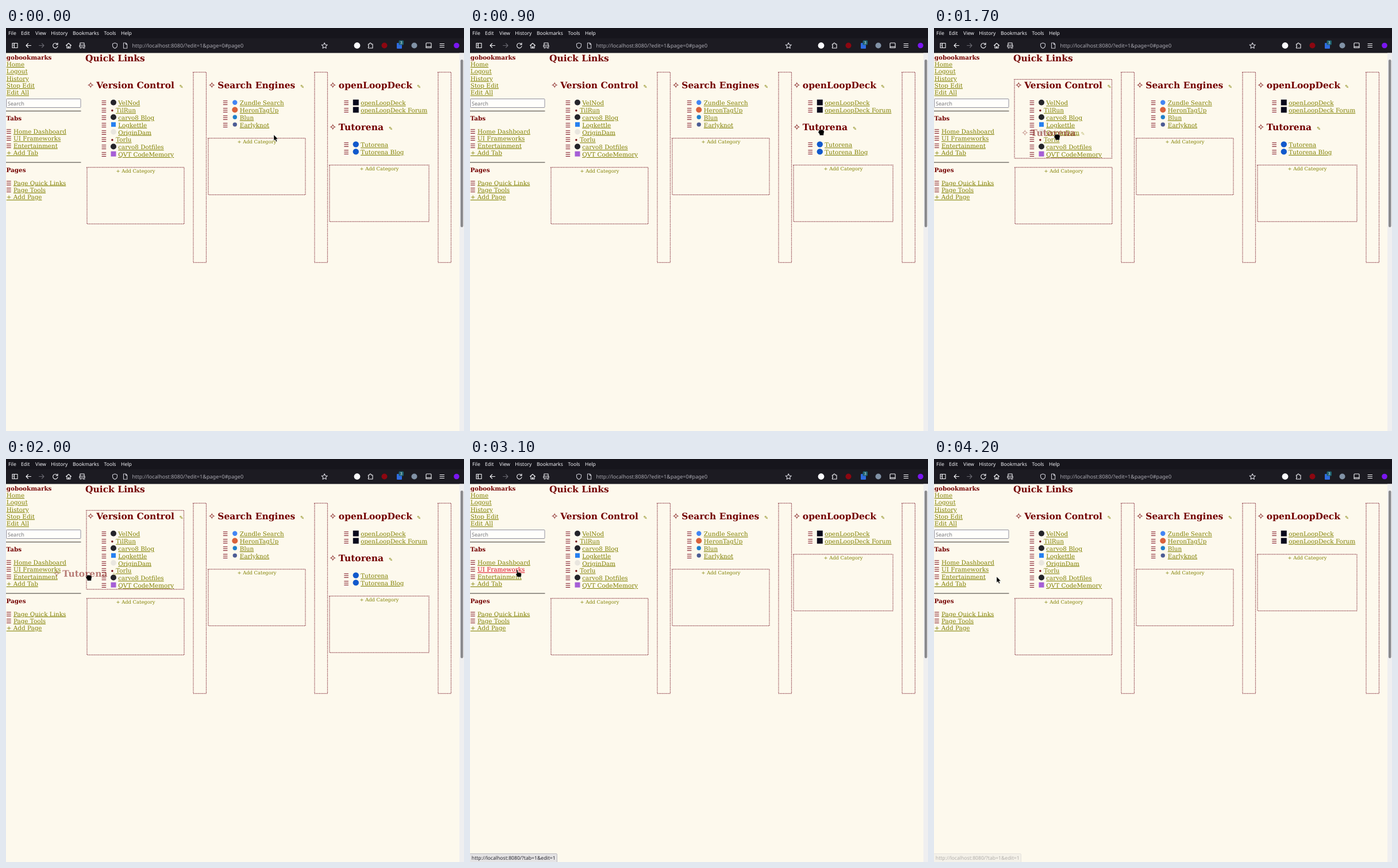
An HTML page for the animation above (4.3 s loop, 797x702 px).

```html
<!DOCTYPE html>
<html lang="en">
<head>
<meta charset="utf-8">
<title>Quick Links</title>
<style>
html, body { margin: 0; width: 797px; height: 702px; overflow: hidden; background: #fdf9ed; }
svg { display: block; }
text { font: 10.4px "DejaVu Serif", serif; white-space: pre; text-rendering: geometricPrecision; }
.b { font-weight: bold; fill: #730000; }
.h { font-size: 15.5px; font-weight: bold; fill: #730000; }
.a { fill: #808000; text-decoration: underline; text-decoration-thickness: 0.8px; }
.hot { fill: #dc0a1e; }
.small { font-size: 8.4px; fill: #808000; text-anchor: middle; }
.sym { font-family: "DejaVu Sans", sans-serif; fill: #7a0a1c; }
.star { font: bold 15.5px "DejaVu Sans", sans-serif; fill: #730000; }
.pen { font: 8.4px "DejaVu Sans", sans-serif; fill: #808000; }
.ui { font: 8.65px "Noto Sans", sans-serif; }
.url { font: 9.1px "Noto Sans", sans-serif; }
.dots { fill: none; stroke: #700c1c; stroke-width: 1.45; stroke-linecap: round; stroke-dasharray: 0 2.667; }
.ico { fill: none; stroke: #f4f4f8; stroke-width: 1.1; stroke-linecap: round; stroke-linejoin: round; }
</style>
</head>
<body>
<svg id="stage" width="797" height="702" viewBox="0 0 797 702"></svg>
<script>
const stage = document.getElementById('stage');
const LOOP = 4300, STEP = 100;

function add(parent, tag, attrs, str) {
  const el = document.createElementNS('http://www.w3.org/2000/svg', tag);
  for (const k in attrs) el.setAttribute(k, attrs[k]);
  if (str !== undefined) el.textContent = str;
  parent.appendChild(el);
  return el;
}
const group = (p = stage) => add(p, 'g', {});
const text = (p, x, y, cls, str, fill) =>
  add(p, 'text', fill ? { x, y, class: cls, fill } : { x, y, class: cls }, str);
const rect = (p, x, y, width, height, fill, rx = 0) =>
  add(p, 'rect', { x, y, width, height, fill, rx });
const disc = (p, cx, cy, r, fill) => add(p, 'circle', { cx, cy, r, fill });
const dots = (p, x, y, width, height) => add(p, 'rect', { x, y, width, height, class: 'dots' });
const icon = (d, stroke) => add(stage, 'path', stroke ? { d, class: 'ico', style: 'stroke:' + stroke } : { d, class: 'ico' });
const show = (el, on) => el.setAttribute('visibility', on ? 'visible' : 'hidden');

function heading(p, x, y, str, penX) {
  text(p, x, y, 'star', '✧');
  text(p, x + 16.5, y, 'h', str);
  text(p, penX, y - 0.3, 'pen', '✎');
}

// Each item: [label, colour, shape, size]; no colour means a bullet.
function list(p, x, y, items, gap) {
  items.forEach(([label, color, shape, size], i) => {
    const by = y + i * 12.8, cx = x + 20.8, cy = by - 4.7;
    text(p, x - 0.4, by, 'sym', '☰');
    if (!color) {
      disc(p, x + 18.7, by - 3.4, 1.7, '#700008');
      text(p, x + 25, by, 'a', label);
      return;
    }
    if (shape === 'sq') rect(p, cx - size, cy - size, size * 2, size * 2, color);
    else disc(p, cx, cy, size, color);
    text(p, x + gap, by, 'a', label);
  });
}

function addBox(p, x, y, w) {
  dots(p, x, y, w, 98.5);
  text(p, x + w / 2, y + 9, 'small', '+ Add Category');
}

function browser() {
  rect(stage, 0, 0, 797, 43.5, '#1c1b22');
  rect(stage, 0, 0, 797, 18, '#16151c');
  [['File', 4], ['Edit', 26], ['View', 51], ['History', 78.3], ['Bookmarks', 116], ['Tools', 170.5], ['Help', 200]]
    .forEach(([s, x]) => text(stage, x, 11.8, 'ui', s, '#f6f6fa'));
  icon('M11 26.5h9v8h-9zM14.5 26.5v8M12.5 29h.5M12.5 31h.5');
  icon('M43.5 30.5h-8.5M38.5 27l-3.5 3.5l3.5 3.5');
  icon('M57.5 30.5h8.5M62.5 27l3.5 3.5l-3.5 3.5', '#686770');
  icon('M89.3 28.2A4.2 4.2 0 1 0 90 31.5M90 26v3h-3');
  icon('M104.5 30.5l4.5-4l4.5 4M106 30v5h6v-5M108.3 35v-2.5h1.5v2.5');
  icon('M129 30v-4h7v4M128 30h9v3h-9zM129 35h2M134 35h3');
  icon('M189.5 26l4 1.4v3q0 3.2-4 5q-4-1.8-4-5v-3z', '#c8c8d0');
  icon('M204.5 26h4l2.2 2.2v7h-6.2zM208.5 26v2.5h2', '#c8c8d0');
  text(stage, 219.5, 34, 'url', 'http://localhost:8080/?edit=1&page=0#page0', '#a9a8b0');
  icon('M554.2 25.8l1.5 3.2l3.5.4l-2.6 2.4l.7 3.5l-3.1-1.8l-3.1 1.8l.7-3.5l-2.6-2.4l3.5-.4z', '#d8d8e0');
  disc(stage, 611, 30.5, 5.4, '#fbfbfe');
  icon('M630.5 28h2v-1q1.5-2 3 0v1h2.5v7h-7.5v-2q2-1.3 0-2.6z');
  disc(stage, 658.5, 30.5, 5, '#8c0711');
  rect(stage, 680, 26, 9, 10, '#2f6be0', 1);
  rect(stage, 683.5, 21.5, 8.5, 8, '#1d5f6c', 1.5);
  text(stage, 685.7, 28.2, 'ui', '3', '#e6f4f6').style.fontSize = '7px';
  disc(stage, 710.5, 30.5, 5, '#8192a6');
  icon('M731 27q0-1 1-1h7q1 0 1 1v7.5h-9zM731 32.5h9');
  icon('M755 27.5h7.5M755 30.5h7.5M755 33.5h7.5');
  disc(stage, 784, 30.5, 4.8, '#7a16f0');
  rect(stage, 789, 43.5, 8, 658.5, '#efeff0');
  rect(stage, 791, 55, 4.5, 292, '#8a8a8d', 2.2);
}

let hoverLink;
function sidebar() {
  text(stage, 0.7, 54.6, 'b', 'gobookmarks');
  ['Home', 'Logout', 'History', 'Stop Edit', 'Edit All']
    .forEach((s, i) => text(stage, 0.8, 67 + i * 12.35, 'a', s));
  add(stage, 'rect', { x: 0.5, y: 123.5, width: 129.5, height: 15, rx: 1, fill: '#fffefb', stroke: '#8f8f9d' });
  text(stage, 3, 134.5, 'url', 'Search', '#77777c');
  rect(stage, 0, 144, 130.5, 1.2, '#5a5752');
  rect(stage, 0, 233.5, 130.5, 1.2, '#5a5752');
  const menu = (title, y, names, last) => {
    text(stage, 0.5, y, 'b', title);
    names.forEach((s, i) => {
      text(stage, 0.3, y + 23 + i * 12.35, 'sym', '☰');
      const el = text(stage, 13, y + 23 + i * 12.35, 'a', s);
      if (s === 'UI Frameworks') hoverLink = el;
    });
    text(stage, 0.8, y + 23 + names.length * 12.35, 'a', last);
  };
  menu('Tabs', 161, ['Home Dashboard', 'UI Frameworks', 'Entertainment'], '+ Add Tab');
  menu('Pages', 250.5, ['Page Quick Links', 'Page Tools'], '+ Add Page');
}

browser();
sidebar();

text(stage, 138, 58.4, 'h', 'Quick Links');
[326, 537, 752].forEach(x => dots(stage, x, 77, 22.5, 331.5));

heading(stage, 140.7, 105.3, 'Version Control', 301.5);
list(stage, 166.2, 134.4, [
  ['VelNod', '#24242a', 'o', 5], ['TilRun'], ['carvo8 Blog', '#24242a', 'o', 5],
  ['Logkettle', '#2680f0', 'sq', 4], ['OriginDam', '#e9e6df', 'o', 4.8], ['Torlu'],
  ['carvo8 Dotfiles', '#24242a', 'o', 5], ['QVT CodeMemory', '#a65fd6', 'sq', 4.5]
], 29);
addBox(stage, 141, 242.7, 169);

heading(stage, 351.8, 105.3, 'Search Engines', 512);
list(stage, 377.5, 134.4, [
  ['Zundle Search', '#4285f4', 'o', 4.2], ['HeronTagUp', '#d9623c', 'o', 5],
  ['Blun', '#1f80cc', 'o', 3.7], ['Earlyknot', '#4c5c94', 'o', 3.7]
], 29.3);
addBox(stage, 352, 192, 169);

heading(stage, 562.3, 105.3, 'openLoopDeck', 715);
list(stage, 588, 134.4, [
  ['openLoopDeck', '#0a0a1c', 'sq', 5], ['openLoopDeck Forum', '#0a0a1c', 'sq', 5]
], 29.2);

const course = group();
heading(course, 562.3, 178, 'Tutorena', 666);
list(course, 588, 207.3, [
  ['Tutorena', '#1159cc', 'o', 5.2], ['Tutorena Blog', '#1159cc', 'o', 5.2]
], 29.2);
const lastBox = group();
addBox(lastBox, 563, 238.7, 173);

// Drop targets
const targets = [
  [351, 89.5, 169, 87], [140, 89.5, 169.5, 137.5],
  [0.7, 172.8, 130, 12.6], [0.7, 185.6, 130, 13.2], [0.7, 198.9, 130, 12.3]
].map(box => ({ box, el: dots(stage, ...box) }));

const ghost = group();
heading(ghost, 562.3, 178, 'Tutorena', 666);
ghost.setAttribute('opacity', 0.5);

const status = group();
add(status, 'rect', { x: -1, y: 687.5, width: 152.5, height: 16, rx: 1.5, fill: '#e4e3e4', stroke: '#bcbbc0' });
text(status, 2.8, 698, 'ui', 'http://localhost:8080/?tab=1&edit=1', '#2a2930');

const pointer = d => add(stage, 'path', { d, fill: '#000', stroke: '#fff', 'stroke-width': 0.4, 'stroke-linejoin': 'round' });
const cursors = {
  arrow: pointer('M0 0V10.3L2.3 8.3L4 12L5.7 11.2L4.1 7.6H7.2Z'),
  fist: pointer('M-4-3.5Q-3-5.3-1.5-4.3Q0-5.8 1.5-4.3Q3-5.2 4-3.5Q5.5-3 5.2-1L4.4 3V5H-2.6V3.2L-5-.2Q-5.7-2-3.8-1.8Z'),
  hand: pointer('M-2.4-4.6Q-1.3-6.3-.2-4.6V-1.2L4.6 0Q6.3.6 6 2.4L5.2 7H-.8L-3.6 2.6Q-3.6.8-2 1.4Z')
};

// Pointer path: [ms, x, y]
const path = [
  [0, 466, 186], [200, 478, 187], [500, 555, 186], [800, 606, 182.5], [900, 611, 182],
  [1000, 621, 181], [1100, 625, 180], [1200, 585, 176], [1300, 488, 165], [1400, 380, 156],
  [1500, 308, 165], [1700, 214, 190], [2000, 144, 207], [2200, 116, 203], [2400, 92, 199],
  [2600, 84, 198], [3500, 83, 199], [3800, 84, 199], [4000, 97, 202], [4200, 109, 205]
];
const GRAB = 1100, DROP = 2700, RELOAD = 2900, HOVER = 3100, LEAVE = 4000;

function at(t) {
  let i = 0;
  while (i < path.length - 2 && path[i + 1][0] <= t) i++;
  const [t0, x0, y0] = path[i], [t1, x1, y1] = path[i + 1];
  const k = Math.min(1, (t - t0) / (t1 - t0));
  return [x0 + (x1 - x0) * k, y0 + (y1 - y0) * k];
}

function draw(ms) {
  const t = Math.floor(ms / STEP) * STEP;
  const [x, y] = at(t);
  const dragging = t > GRAB && t < DROP;
  const over = t >= HOVER && t < LEAVE;

  show(course, t < RELOAD);
  lastBox.setAttribute('transform', `translate(0 ${t < RELOAD ? 0 : -72.7})`);

  show(ghost, dragging);
  ghost.setAttribute('transform', `translate(${x - 624.5} ${y - 180.3})`);
  for (const { box: [bx, by, w, h], el } of targets)
    show(el, dragging && x >= bx && x < bx + w && y >= by && y < by + h);

  hoverLink.setAttribute('class', over ? 'a hot' : 'a');
  show(status, t >= HOVER);
  status.setAttribute('opacity', t >= 4200 ? 0.35 : 1);

  const kind = over ? 'hand' : t >= 800 && t < DROP ? 'fist' : 'arrow';
  for (const k in cursors) show(cursors[k], k === kind);
  cursors[kind].setAttribute('transform', `translate(${x} ${y})`);
}

const start = performance.now();
function tick(now) {
  draw(Math.max(0, now - start) % LOOP);
  requestAnimationFrame(tick);
}
draw(0);
requestAnimationFrame(tick);
</script>
</body>
</html>
```
